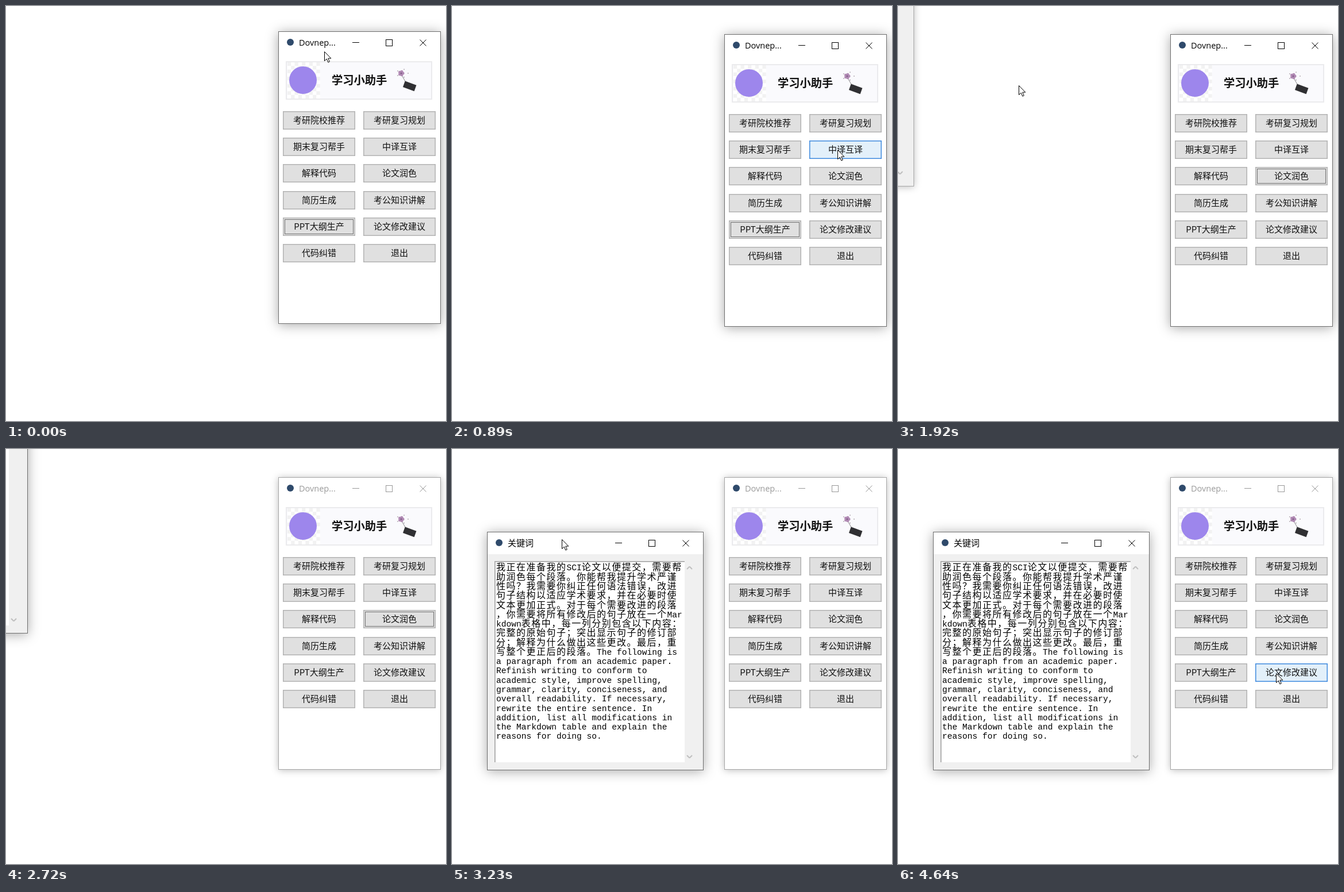
These frames come from a looping animation (766x722 px, 5020 ms). An HTML page with a canvas:

```html
<!DOCTYPE html>
<html lang="zh-CN">
<head>
<meta charset="utf-8">
<title>学习小助手</title>
<style>
html, body { margin: 0; width: 100%; height: 100%; overflow: hidden; background: #fff; }
canvas { display: block; }
</style>
</head>
<body>
<canvas id="stage" width="766" height="722"></canvas>
<script>
const ctx = document.getElementById('stage').getContext('2d');
const LOOP = 5020, STEP = 46.92;
const SANS = '"Noto Sans CJK SC", "Noto Sans CJK", "Noto Sans", sans-serif';
const OPEN_AT = 1600, DRAG_FROM = 2715, DRAG_TO = 3237;

const BUTTONS = [
  '考研院校推荐', '考研复习规划', '期末复习帮手', '中译互译',
  '解释代码', '论文润色', '简历生成', '考公知识讲解',
  'PPT大纲生产', '论文修改建议', '代码纠错', '退出'
];
const PROMPT = `我正在准备我的SCI论文以便提交，需要帮
助润色每个段落。你能帮我提升学术严谨
性吗？我需要你纠正任何语法错误，改进
句子结构以适应学术要求，并在必要时使
文本更加正式。对于每个需要改进的段落
，你需要将所有修改后的句子放在一个Mar
kdown表格中，每一列分别包含以下内容：
完整的原始句子；突出显示句子的修订部
分；解释为什么做出这些更改。最后，重
写整个更正后的段落。The following is
a paragraph from an academic paper.
Refinish writing to conform to
academic style, improve spelling,
grammar, clarity, conciseness, and
overall readability. If necessary,
rewrite the entire sentence. In
addition, list all modifications in
the Markdown table and explain the
reasons for doing so.`.split('\n');
const ARROW = new Path2D('M0 0V16L3.8 12.6 6.3 18.5 8.8 17.4 6.3 11.6H11.3Z');

// Progress from 0 to 1 between two times, easing out with the given power.
function ease(t, from, to, power = 1) {
  const k = Math.min(1, Math.max(0, (t - from) / (to - from)));
  return 1 - (1 - k) ** power;
}

const mix = (a, b, k) => Math.round(a + (b - a) * k);

const mainY = t => mix(44, 49, ease(t, 94, 380));

const popupAt = t => [
  mix(-349, 61, ease(t, DRAG_FROM, DRAG_TO, 2)),
  mix(-101, 144, ease(t, DRAG_FROM, DRAG_TO, 2.3))
];

function cursorAt(t) {
  if (t < 516) return [554, mainY(t) + 35];
  if (t < 1079) return [
    mix(554, 684, ease(t, 516, 1079, 2.1)),
    mix(84, 294, ease(t, 516, 1079, 1.42))
  ];
  if (t < OPEN_AT) {
    // Sweep down the column and back up.
    const k = ease(t, 1079, 1450);
    return [mix(684, 680, k), mix(294, 299, k) + Math.round(132 * Math.sin(Math.PI * k))];
  }
  if (t < DRAG_FROM) {
    const k = ease(t, 1645, 2060);
    return [mix(680, -20, k), mix(299, 60, k)];
  }
  if (t < 3570) {
    // The dragged window trails the pointer slightly.
    const [x, y] = popupAt(t + STEP * 0.7);
    return [x + 130, y + 13];
  }
  const back = ease(t, 3570, 3660), cross = ease(t, 3755, 4450, 2);
  return [mix(mix(191, 168, back), 658, cross), mix(mix(157, 141, back), 390, cross)];
}

function box(x, y, w, h, fill) {
  ctx.fillStyle = fill;
  ctx.fillRect(x, y, w, h);
}

function frame(x, y, w, h, color, width = 1) {
  ctx.strokeStyle = color;
  ctx.lineWidth = width;
  ctx.strokeRect(x + width / 2, y + width / 2, w - width, h - width);
}

function disc(x, y, r, fill) {
  ctx.fillStyle = fill;
  ctx.beginPath();
  ctx.arc(x, y, r, 0, Math.PI * 2);
  ctx.fill();
}

function line(x0, y0, x1, y1, color, width = 1) {
  ctx.strokeStyle = color;
  ctx.lineWidth = width;
  ctx.beginPath();
  ctx.moveTo(x0, y0);
  ctx.lineTo(x1, y1);
  ctx.stroke();
}

function label(text, x, midY, font, size, color = '#000', align = 'left') {
  ctx.font = font;
  ctx.fillStyle = color;
  ctx.textAlign = align;
  ctx.fillText(text, x, midY + size * 0.36);
}

function drawWindow(w, h, title, titleFont, active, fill) {
  ctx.save();
  ctx.shadowColor = active ? 'rgba(0,0,0,.34)' : 'rgba(0,0,0,.26)';
  ctx.shadowBlur = active ? 20 : 12;
  ctx.shadowOffsetY = active ? 2 : 1;
  box(0, 0, w, h, '#fff');
  ctx.restore();
  box(0, 39, w, h - 39, fill);
  frame(0, 0, w, h, active ? '#6e6e6e' : '#a6a6a6');

  const ink = active ? '#000' : '#999';
  disc(21, 19, 6, '#2f4a6b');
  label(title, 36, 19.5, titleFont, 15, ink);
  box(w - 154, 19, 12, 1, ink);
  frame(w - 96, 14, 12, 12, ink);
  for (const side of [-1, 1])
    line(w - 31 - 5.5 * side, 14.5, w - 31 + 5.5 * side, 25.5, ink);
}

function drawFlower() {
  line(214, 75, 224, 92, '#88888c');
  for (let i = 0; i < 5; i++) {
    const a = i * Math.PI * 0.4;
    disc(214 + Math.cos(a) * 3, 73 + Math.sin(a) * 3, 2.5, '#b18ab4');
    disc(216 + Math.cos(a) * 10, 73 + Math.sin(a) * 7, 1, '#b5adb5');
  }
  disc(214, 73, 1.6, '#83608a');
  ctx.save();
  ctx.translate(229, 96);
  ctx.rotate(0.35);
  box(-11, -6, 21, 11, '#303033');
  ctx.restore();
}

function drawBanner() {
  box(13, 52, 255, 67, '#fafafd');
  frame(13, 52, 255, 67, '#ebebed', 2);
  for (let r = 0; r < 10; r++)
    for (let c = 0; c < 9; c++)
      box(16 + c * 6.3, 54 + r * 6.3, 6.3, 6.3, (r + c) % 2 ? '#fff' : '#f2f2f2');
  disc(43, 85, 24, '#9d86ec');
  label('学习小助手', 93, 85, `bold 19.3px ${SANS}`, 19.3, '#111');
  drawFlower();
}

const buttonSpot = i => [8 + i % 2 * 140, 139 + Math.round(Math.floor(i / 2) * 46.2)];

function drawButton(i, hover, focus) {
  const [x, y] = buttonSpot(i), w = 126, h = 32;
  box(x, y, w, h, hover ? '#e3f0fa' : '#e0e0e0');
  frame(x, y, w, h, hover ? '#3f8ade' : '#b3b3b3', 1.5);
  if (focus) {
    ctx.setLineDash([1, 1]);
    frame(x + 3, y + 3, w - 6, h - 6, '#000');
    ctx.setLineDash([]);
  }
  label(BUTTONS[i], x + w / 2, y + h / 2, `15px ${SANS}`, 15, '#111', 'center');
}

function drawMain(t, cursor) {
  const x = 474, y = mainY(t);
  const focused = t < OPEN_AT ? 8 : t < 2760 ? 5 : -1;
  ctx.save();
  ctx.translate(x, y);
  drawWindow(283, 509, 'Dovnep...', '14.5px "Open Sans", "Noto Sans", sans-serif', t < DRAG_FROM, '#fff');
  drawBanner();
  BUTTONS.forEach((_, i) => {
    const [bx, by] = buttonSpot(i);
    const px = cursor[0] - x - bx, py = cursor[1] - y - by;
    drawButton(i, px >= 0 && px < 126 && py >= 0 && py < 32, i === focused);
  });
  ctx.restore();
}

function drawPrompt() {
  PROMPT.forEach((text, row) => {
    let x = 16;
    for (const run of text.match(/[ -~]+|[^ -~]+/g)) {
      const latin = run.charCodeAt(0) < 127;
      const font = latin ? '14.58px "Liberation Mono", monospace' : `16px ${SANS}`;
      ctx.letterSpacing = latin ? '0px' : '1.5px';
      label(run, x, 62 + row * 16.28, font, 15);
      x += ctx.measureText(run).width;
    }
  });
  ctx.letterSpacing = '0px';
}

function drawPopup(t) {
  ctx.save();
  ctx.translate(...popupAt(t));
  drawWindow(377, 415, '关键词', `15px ${SANS}`, t >= DRAG_FROM, '#f0f0f0');
  box(13, 51, 331, 350, '#a0a0a0');
  box(14, 52, 330, 349, '#c8c8c8');
  box(15, 53, 329, 348, '#fff');
  for (const side of [-1, 1]) {
    line(352.5 + 4.5 * side, 65, 352.5, 60.5, '#bfbfbf', 2);
    line(352.5 + 4.5 * side, 389, 352.5, 393.5, '#bfbfbf', 2);
  }
  drawPrompt();
  ctx.restore();
}

function drawCursor([x, y]) {
  ctx.save();
  ctx.translate(x + 0.5, y + 0.5);
  ctx.fillStyle = '#fff';
  ctx.fill(ARROW);
  ctx.strokeStyle = '#000';
  ctx.lineWidth = 1;
  ctx.stroke(ARROW);
  ctx.restore();
}

function render(now) {
  const t = Math.floor((now % LOOP + 10) / STEP) * STEP;
  const cursor = cursorAt(t);
  box(0, 0, 766, 722, '#fff');
  drawMain(t, cursor);
  if (t >= OPEN_AT) drawPopup(t);
  drawCursor(cursor);
}

const start = performance.now();
function tick() {
  render(performance.now() - start);
  requestAnimationFrame(tick);
}
tick();
</script>
</body>
</html>
```
